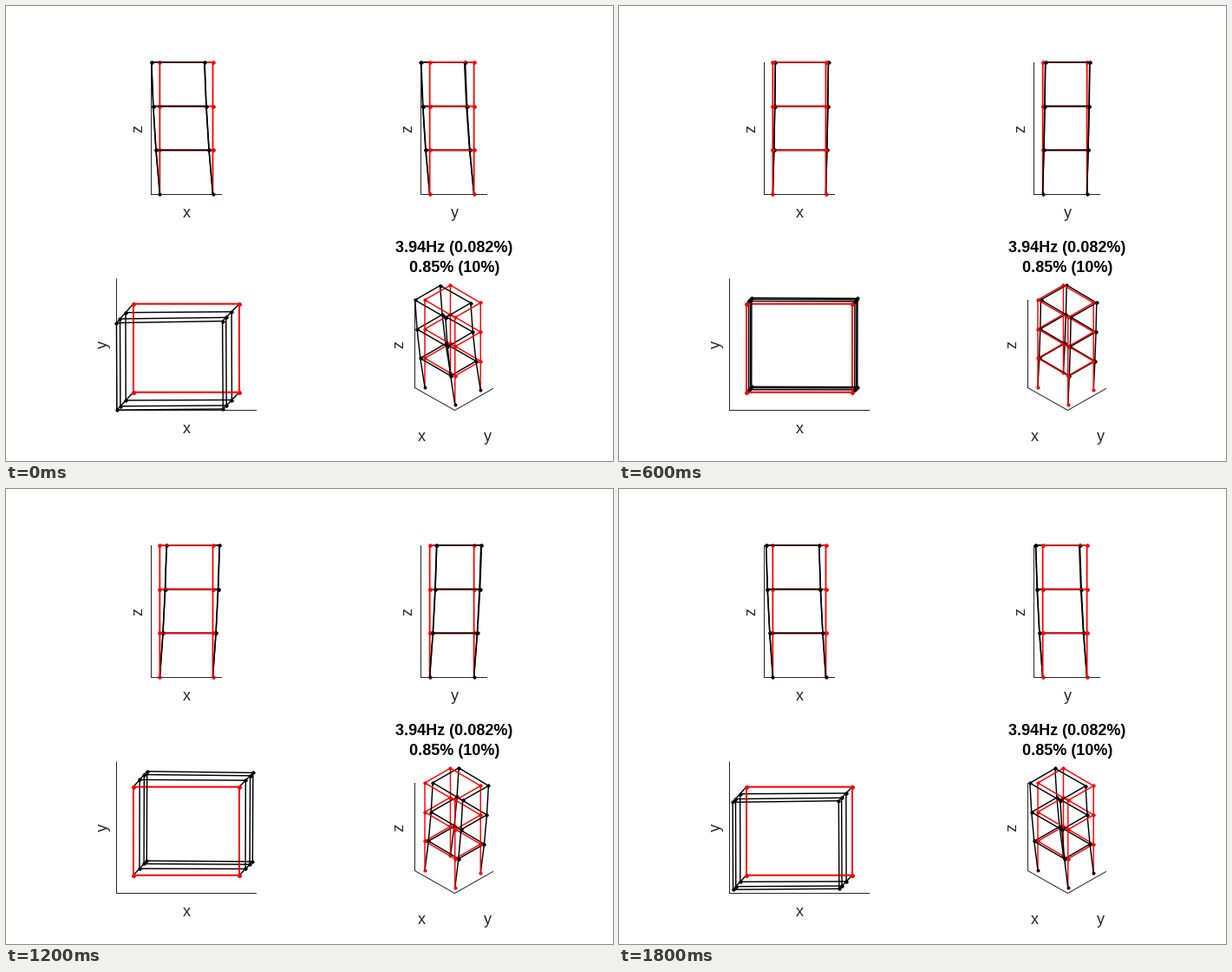
A matplotlib script that plays this animation: 700x525 px, repeating every 2000 ms.

```python
import numpy as np
import matplotlib.pyplot as plt
from matplotlib.animation import FuncAnimation

W, H, DPI = 700, 525, 100
FRAMES, INTERVAL = 10, 200
PX = 72 / DPI  # points per pixel
INK = "#262626"

plt.rcParams["font.family"] = "Liberation Sans"
fig = plt.figure(figsize=(W / DPI, H / DPI), dpi=DPI, facecolor="white")
ax = fig.add_axes([0, 0, 1, 1])
ax.set(xlim=(0, W), ylim=(H, 0))
ax.axis("off")

# Three-storey frame: corners run around the floor plan
LX, LY, STOREY = 61.1, 51, 50.8
PLAN = np.array([(0, 0), (LX, 0), (LX, LY), (0, LY)])
SWAY = np.array([(-9.5, -10.25), (-9.4, -9.7), (-9.75, -10), (-9.75, -11)])
MODE = [0, 0.46, 0.79, 1]

EDGES = []
for lv in range(1, 4):
    for c in range(4):
        EDGES.append(((lv - 1, c), (lv, c)))
        EDGES.append(((lv, c), (lv, (c + 1) % 4)))


# Each view returns screen x, screen y and nearness to the viewer
def front(x, y, z):
    return 177.4 + x, 217.2 - z, -y


def side(x, y, z):
    return 488.6 + y, 217.2 - z, x


def top(x, y, z):
    return 146.9 + 2 * x, 445.6 - 2 * y, z


def iso(x, y, z):
    return (483.0 + 0.569 * x + 0.578 * y,
            440.0 + 0.333 * (x - y) - 0.662 * z,
            0.573 * (x - y) + 0.585 * z)


VIEWS = [front, side, top, iso]


def nodes(amount):
    """Node positions indexed by level, corner and axis."""
    pts = np.zeros((4, 4, 3))
    for lv, m in enumerate(MODE):
        pts[lv, :, :2] = PLAN + amount * m * SWAY
        pts[lv, :, 2] = lv * STOREY
    return pts


def axis_line(*pts):
    xs, ys = zip(*pts)
    ax.plot(xs, ys, color=INK, lw=1 * PX, zorder=0, snap=False)


def label(x, y, s, rotation=0, size=18, **kw):
    ax.text(x, y, s, fontsize=size * PX, ha="center", va="baseline",
            rotation=rotation, rotation_mode="anchor",
            **{"color": INK, **kw})


axis_line((167.5, 65.5), (167.5, 217.5), (248.5, 217.5))
axis_line((478.5, 65.5), (478.5, 217.5), (554.5, 217.5))
axis_line((127.5, 315), (127.5, 466.5), (288.5, 466.5))
axis_line((471.5, 339.5), (471.5, 440.5), (517.5, 466.5), (561.5, 441.5))

label(208.5, 244, "x")
label(157, 141, "z", 90)
label(517.5, 244, "y")
label(468, 141, "z", 90)
label(208.5, 493, "x")
label(116.5, 390.5, "y", 90)
label(479.5, 501.5, "x")
label(555.5, 501.5, "y")
label(458.5, 390.5, "z", 90)
label(516.7, 284.3, "3.94Hz (0.082%)", weight="bold", color="black")
label(516.7, 307.3, "0.85% (10%)", weight="bold", color="black")


def make_bars(color):
    return [[ax.plot([], [], color=color, lw=1.45 * PX, marker="o",
                     ms=3.7 * PX, mew=0, snap=False)[0] for _ in EDGES]
            for _ in VIEWS]


rest_bars = make_bars("red")
mode_bars = make_bars("black")


def place(bars, pts, bias):
    for view, group in zip(VIEWS, bars):
        for bar, (a, b) in zip(group, EDGES):
            x, y, near = view(*np.array([pts[a], pts[b]]).T)
            bar.set_data(x, y)
            bar.set_zorder(1000 + near.mean() + bias)


place(rest_bars, nodes(0), 0)


def update(i):
    place(mode_bars, nodes(np.cos(2 * np.pi * i / FRAMES)), 1e-6)
    return [bar for group in mode_bars for bar in group]


anim = FuncAnimation(fig, update, frames=FRAMES, interval=INTERVAL,
                     repeat=True, repeat_delay=0, blit=False)
plt.show()
```
